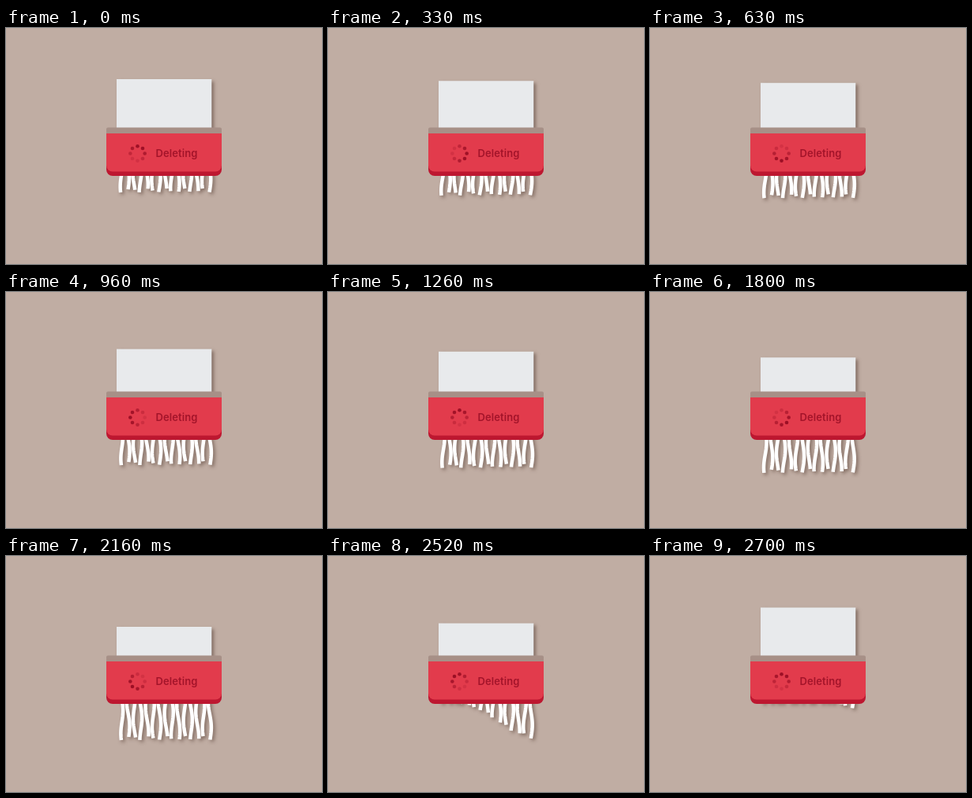
Write an HTML page with a canvas that moves like this. It is 400x300 px and loops after 2730 ms.

```html
<!DOCTYPE html>
<html lang="en">
<head>
<meta charset="utf-8">
<title>Deleting</title>
<style>
  html, body { margin: 0; height: 100%; overflow: hidden; background: #c0ada3; }
  canvas { display: block; }
</style>
</head>
<body>
<canvas width="400" height="300"></canvas>
<script>
const ctx = document.querySelector('canvas').getContext('2d');
const TAU = 2 * Math.PI;
const LOOP = 2730, FEED_END = 2160, REWIND = 300, FEED = 25;
const STRIPS = 15, STRIP_GAP = 7.95;

const clamp = p => Math.min(1, Math.max(0, p));
const easeInOut = p => p < 0.5 ? 2 * p * p : 1 - 2 * (1 - p) ** 2;
const rewind = (t, start) => easeInOut(clamp((t - start) / REWIND));

function withShadow(draw) {
  ctx.save();
  ctx.shadowColor = 'rgba(70, 45, 35, 0.5)';
  ctx.shadowOffsetX = ctx.shadowOffsetY = 2.5;
  ctx.shadowBlur = 4;
  draw();
  ctx.restore();
}

function roundBox(x, y, w, h, radii, color) {
  ctx.fillStyle = color;
  ctx.beginPath();
  ctx.roundRect(x, y, w, h, radii);
  ctx.fill();
}

// Wavy strips slide down together, then snap back one after another
function drawStrips(t) {
  const feed = FEED * clamp(t / FEED_END);
  const sway = 1.2 * Math.cos((t - 1560) / 1200 * TAU);
  ctx.beginPath();
  for (let i = 0; i < STRIPS; i++) {
    const x = 146 + i * STRIP_GAP;
    const end = 206.5 + 2.5 * Math.cos(i * 2.2);
    const bottom = end + feed - (end - 162) * rewind(t, 2190 + i * 20.7);
    for (let u = 0; u <= 60; u += 3) {
      const drift = -sway * (1 - u / 60);
      const wave = 1.7 * Math.sin(u / 10 + i * 2.4 + 4);
      ctx[u ? 'lineTo' : 'moveTo'](x + drift + wave, bottom - u);
    }
  }
  ctx.strokeStyle = '#fff';
  ctx.lineWidth = 4.5;
  withShadow(() => ctx.stroke());
}

function drawPaper(t) {
  const p = clamp(t / FEED_END);
  const top = 65 + FEED * (0.6 * p + 0.4 * p ** 3) * (1 - rewind(t, 2430));
  withShadow(() => roundBox(140, top, 120.3, 140 - top, 0, '#e8eaec'));
}

function drawSpinner(t) {
  const head = (0.055 + 2 * t / LOOP) * TAU;
  ctx.fillStyle = '#9c0f25';
  for (let i = 0; i < 8; i++) {
    const a = i / 8 * TAU;
    ctx.globalAlpha = 0.6 + 0.4 * Math.cos(a - head);
    ctx.beginPath();
    ctx.arc(166.5 + 9.2 * Math.sin(a), 159.5 - 9.2 * Math.cos(a), 2.3, 0, TAU);
    ctx.fill();
  }
  ctx.globalAlpha = 1;
}

function drawShredder(t) {
  roundBox(127, 126.5, 146, 10, [2, 2, 0, 0], '#a79087');
  roundBox(127, 150, 146, 38, [0, 0, 8, 8], '#bd1730');
  roundBox(127, 134, 146, 48.5, [0, 0, 8, 8], '#e23b4c');
  drawSpinner(t);
  ctx.fillStyle = '#a3142a';
  ctx.font = '600 13px Inter, sans-serif';
  ctx.letterSpacing = '0.1px';
  ctx.fillText('Deleting', 189.5, 163.5);
}

function frame(now) {
  const t = now % LOOP;
  ctx.fillStyle = '#c0ada3';
  ctx.fillRect(0, 0, 400, 300);
  drawStrips(t);
  drawPaper(t);
  drawShredder(t);
  requestAnimationFrame(frame);
}
requestAnimationFrame(frame);
</script>
</body>
</html>
```
